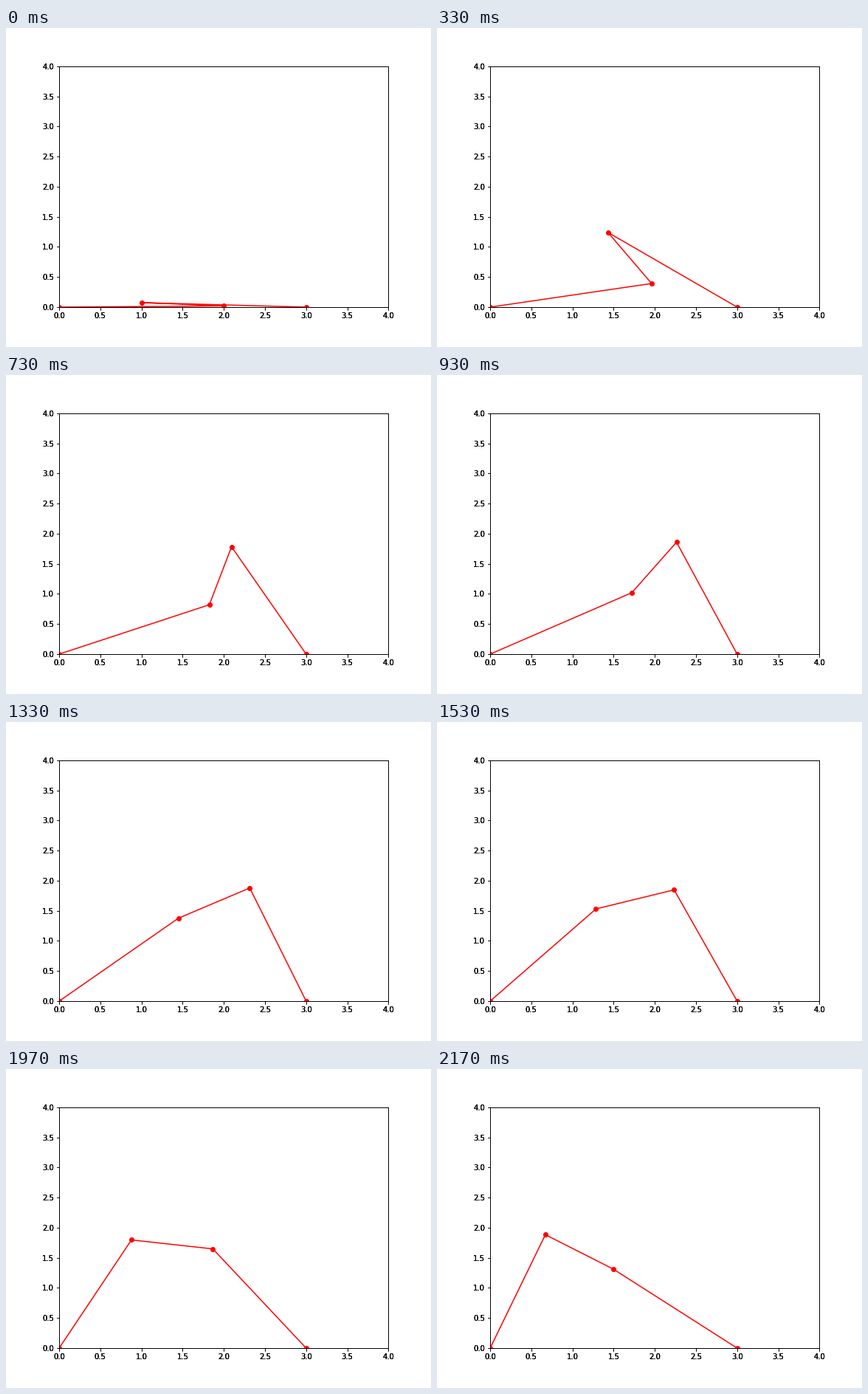
Write a matplotlib script that moves like this. It is 576 by 432 pixels and loops after 2210 ms.

```python
import math

import matplotlib.pyplot as plt
from matplotlib.animation import FuncAnimation

CRANK, ROCKER, COUPLER, BASE = 2, 2, 1, 3
START_ANGLE, ANGLE_STEP = 0.01, 0.01875
POSES, POSES_PER_TICK = 66, 0.3
TICKS, TICK_MS = 221, 10
LAYERS = 3

plt.rcParams.update({"font.family": "DejaVu Sans", "font.size": 10})
fig = plt.figure(figsize=(8, 6), dpi=72, facecolor="white")


def add_plot_area():
    ax = fig.add_axes([0.125, 0.125, 0.775, 0.755], facecolor="none")
    ax.set(xlim=(0, 4), ylim=(0, 4))
    ticks = [i / 2 for i in range(9)]
    ax.set_xticks(ticks)
    ax.set_yticks(ticks)
    return ax


def linkage(angle):
    """Joint positions of the four-bar linkage for a crank angle."""
    bx, by = CRANK * math.cos(angle), CRANK * math.sin(angle)
    reach = math.hypot(bx - BASE, by)
    cos_inner = (reach**2 + ROCKER**2 - COUPLER**2) / (2 * reach * ROCKER)
    rocker = math.atan2(by, bx - BASE) - math.acos(min(1, cos_inner))
    cx = BASE + ROCKER * math.cos(rocker)
    cy = ROCKER * math.sin(rocker)
    return [0, bx, cx, BASE], [0, by, cy, 0]


# Stacked plot areas give the labels and axes their heavy black edges.
ax = [add_plot_area() for _ in range(LAYERS)][-1]
line, = ax.plot([], [], "o-", color="red", lw=1.5, ms=6)


def update(tick):
    pose = min(POSES - 1, int((tick + 0.5) * POSES_PER_TICK))
    line.set_data(*linkage(START_ANGLE + ANGLE_STEP * pose))
    return line,


anim = FuncAnimation(fig, update, frames=TICKS, interval=TICK_MS,
                     init_func=lambda: update(0), repeat=True, repeat_delay=0)
plt.show()
```
